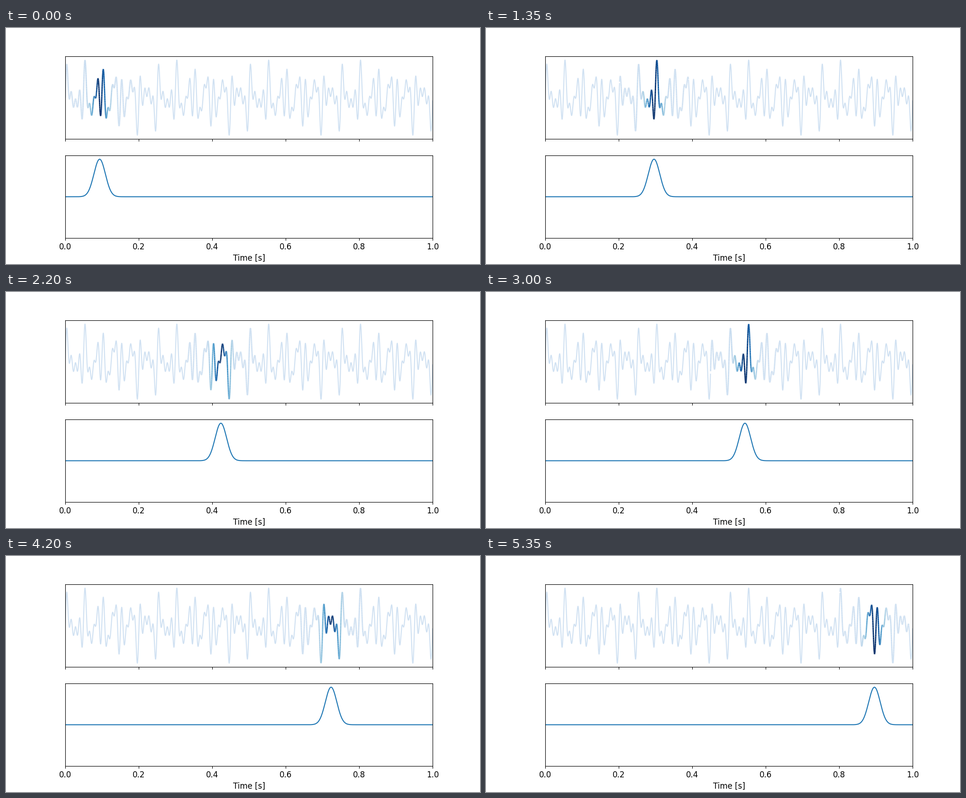
These frames come from a looping animation (1000x500 px, 5400 ms). A matplotlib script:

```python
import numpy as np
import matplotlib.pyplot as plt
from matplotlib.animation import FuncAnimation
from matplotlib.collections import LineCollection

plt.rcParams.update({"font.family": "DejaVu Sans", "font.size": 12})

RATE = 4000      # samples per second
WIDTH = 750      # window length in samples
STEP = 30        # window shift per frame
FRAMES = 108
INTERVAL = 50
LIGHT = plt.cm.Blues(0.2)

t = np.arange(RATE) / RATE
signal = sum(np.sin(2 * np.pi * f * t) for f in (24, 40, 60, 80))
points = np.column_stack([t, signal])

offset = np.arange(WIDTH) - (WIDTH - 1) / 2
window = np.exp(-0.5 * (offset / (WIDTH / 12)) ** 2)

fig, (top, bottom) = plt.subplots(2, 1, sharex=True, figsize=(10, 5), dpi=100)
for ax in (top, bottom):
    ax.set_xlim(0, 1)
    ax.set_yticks([])
peak = 1.1 * signal.max()
top.set_ylim(-peak, peak)
bottom.set_ylim(-1.1, 1.1)
bottom.set_xticks(np.linspace(0, 1, 6))
bottom.set_xlabel("Time [s]")

before, = top.plot([], [], color=LIGHT, lw=1.5)
after, = top.plot([], [], color=LIGHT, lw=1.5)
# Zero weight maps to the same light blue as the rest of the signal
glow = LineCollection([], cmap="Blues", norm=plt.Normalize(-0.25, 1), lw=2)
glow.set_array(window[:-1])
top.add_collection(glow, autolim=False)
bell, = bottom.plot(t, np.zeros(RATE), color="tab:blue", lw=1.5)


def draw(frame):
    start = frame * STEP
    end = start + WIDTH
    before.set_data(t[:start], signal[:start])
    after.set_data(t[end:], signal[end:])
    part = points[start:end]
    glow.set_segments(np.stack([part[:-1], part[1:]], axis=1))
    weights = np.zeros(RATE)
    weights[start:end] = window
    bell.set_ydata(weights)
    return before, after, glow, bell


anim = FuncAnimation(fig, draw, frames=FRAMES, init_func=lambda: draw(0),
                     interval=INTERVAL, repeat=True, repeat_delay=0)
plt.show()
```
